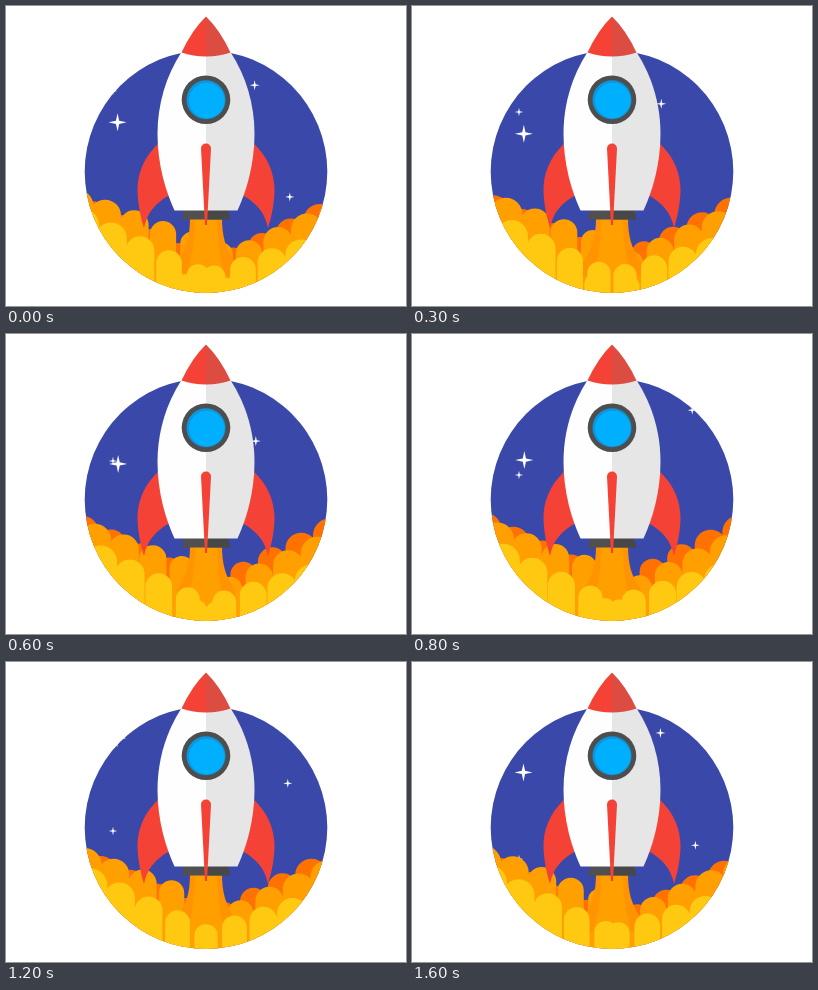
Animation of 400 by 300 pixels, one loop 1700 ms. Source, as an HTML page:

```html
<!DOCTYPE html>
<html lang="en">
<head>
<meta charset="utf-8">
<title>Rocket launch</title>
<style>
html, body { margin: 0; width: 100%; height: 100%; overflow: hidden; background: #fff; }
svg { display: block; width: 100vw; height: 100vh; }
</style>
</head>
<body>
<svg viewBox="0 0 400 300">
  <defs>
    <clipPath id="disc"><circle cx="200" cy="165.600" r="121.300"/></clipPath>
  </defs>
  <g clip-path="url(#disc)">
    <rect width="400" height="300" fill="#3a49a9"/>
    <g id="stars" fill="#fff"></g>
    <path id="back" fill="#ff7200"/>
    <path id="mid" fill="#ffa000"/>
    <path fill="#ff9400" d="M184 212C184 229 181 242 171 256V270H229V256C219 242 216 229 216 212Z"/>
    <path fill="#ffa000" d="M189 212C189 232 187 248 181 270H219C213 248 211 232 211 212Z"/>
    <path id="front" fill="#ffc912"/>
  </g>
  <g fill="#f44336">
    <path id="fin" d="M154 136C138 150 131 168 131.500 186C132 199 134.500 211 138 222C141 207 149 197 164 189Z"/>
    <use href="#fin" transform="matrix(-1 0 0 1 400 0)"/>
  </g>
  <path fill="#505050" d="M178 204H222L224 213.500H176Z"/>
  <path fill="#484848" d="M200 204H222L224 213.500H200Z"/>
  <path fill="#fefefe" d="M200 46H175.500C160 70 151.500 98 151.500 128C151.500 158 159.500 185 168.500 204.500H200Z"/>
  <path fill="#e6e6e6" d="M200 46H224.500C240 70 248.500 98 248.500 128C248.500 158 240.500 185 231.500 204.500H200Z"/>
  <path fill="#f44336" d="M200 10.500Q186 24 175.500 46.500Q187 50.500 200 50.500Z"/>
  <path fill="#dc4c40" d="M200 10.500Q214 24 224.500 46.500Q213 50.500 200 50.500Z"/>
  <circle cx="200" cy="93.700" r="24.300" fill="#4e4e4e"/>
  <circle cx="200" cy="93.700" r="19.500" fill="#0f95dc"/>
  <circle cx="200.800" cy="94.500" r="17.800" fill="#00b0ff"/>
  <path fill="#f44336" d="M195 142.500A5 5 0 0 1 205 142.500L201 219H199Z"/>
</svg>
<script>
const LOOP = 1700, STEP = 100, GAP = 29;
const $ = id => document.getElementById(id);

// Cloud rows: where the first puff starts, bob height,
// and for each side the top at the middle and its rise per pixel outwards
const CLOUDS = [
  { id: "back", start: -2, bob: 5, left: [245, 0.48], right: [250, 0.5] },
  { id: "mid", start: -15, bob: 0, left: [231, 0.37], right: [254, 0.46] },
  { id: "front", start: -21, bob: 0, left: [262, 0.48], right: [262, 0.3] }
];

const slowing = s => 0.111 * s - 0.000052 * s * s;
const steady = s => 0.07 * s;
const swing = s => 59 * (1 - Math.cos(Math.PI * s / 1050));

// Falling stars: size, first position, sideways drift per ms, entry time and duration
const STARS = [
  { r: 9, x: 111, y: 71, drift: 0.001, from: 1150, life: 1350, fall: slowing },
  { r: 5, x: 248, y: 49, drift: 0.002, from: 1380, life: 1020, fall: slowing },
  { r: 4.5, x: 280, y: 75.5, drift: 0.004, from: 750, life: 1050, fall: swing },
  { r: 4.2, x: 107, y: 85, drift: 0, from: 0, life: 1600, fall: steady }
];

function puff(x, top, r) {
  return `M${x - r} 300V${top + r}a${r} ${r} 0 0 1 ${2 * r} 0V300Z`;
}

// Puffs travel outwards by one gap per loop, so the row repeats without a seam
function cloud({ start, bob, left, right }, t) {
  const lift = bob * Math.sin(2 * Math.PI * (t - 375) / LOOP);
  let d = "";
  for (let i = 0; i < 6; i++) {
    const out = start + GAP * (i + t / LOOP);
    const r = 11 + 0.05 * Math.abs(out);
    d += puff(200 - out, left[0] - left[1] * out - lift, r);
    d += puff(200 + out, right[0] - right[1] * out - lift, r);
  }
  return d;
}

function sparkle(r) {
  const k = r * 0.18;
  return `M0 ${-r}L${k} ${-k}L${r} 0L${k} ${k}L0 ${r}L${-k} ${k}L${-r} 0L${-k} ${-k}Z`;
}

for (const star of STARS) {
  star.el = document.createElementNS("http://www.w3.org/2000/svg", "path");
  star.el.setAttribute("d", sparkle(star.r));
  $("stars").append(star.el);
}

function draw(t) {
  for (const { el, x, y, drift, from, life, fall } of STARS) {
    const age = (t - from + LOOP) % LOOP;
    el.style.display = age <= life ? "" : "none";
    el.setAttribute("transform", `translate(${x + drift * age} ${y + fall(age)})`);
  }
  for (const row of CLOUDS) $(row.id).setAttribute("d", cloud(row, t));
}

const begin = performance.now();
function tick() {
  const t = (performance.now() - begin) % LOOP;
  draw(Math.floor(t / STEP) * STEP);
  requestAnimationFrame(tick);
}
tick();
</script>
</body>
</html>
```
